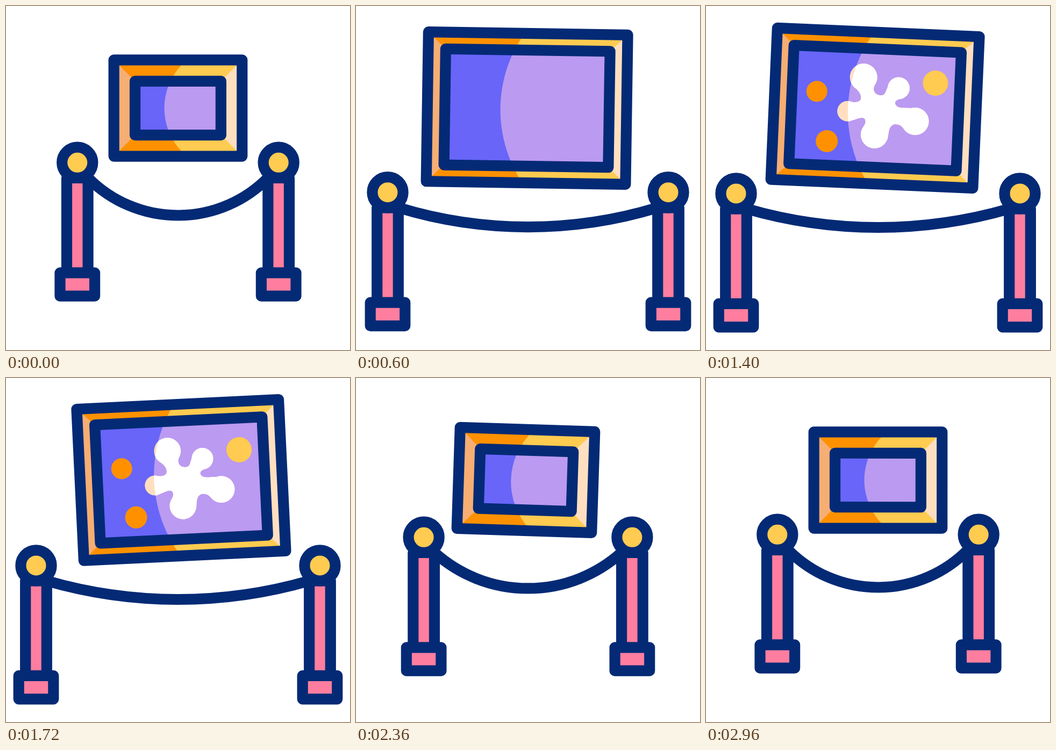
An HTML page with a canvas that plays this animation: 640x640 px, repeating every 3 s.

```html
<!DOCTYPE html>
<html lang="en">
<head>
<meta charset="utf-8">
<title>Gallery</title>
<style>
html, body { margin: 0; width: 100%; height: 100%; overflow: hidden; background: #fff; }
canvas { display: block; width: 100vmin; height: 100vmin; }
</style>
</head>
<body>
<canvas id="stage" width="640" height="640"></canvas>
<script>
const c = document.getElementById('stage').getContext('2d');
const LOOP = 3000;
const NAVY = '#042a75', PINK = '#ff7e9f', YELLOW = '#ffcb50', ORANGE = '#ff9100',
  PEACH = '#f6ae73', CREAM = '#ffdfbf', BLUE = '#6865f8', LILAC = '#bb9af1';

const SPLAT = new Path2D('M317 147C312 156 317 166 328 166C338 166 337 158 341 150' +
  'A20.5 20.5 0 1 1 364 172C356 174 354 179 357 183C362 190 374 187 386 188' +
  'A25.5 25.5 0 1 1 374 228C369 220 362 218 356 219C346 222 346 231 344.5 243' +
  'A25.5 25.5 0 1 1 299 224C304 217 302 208 295 209C288 209 283 213 277 214' +
  'A19 19 0 1 1 275 180C282 181 288 180 291 176C294 170 290 161 282 155' +
  'A25.5 25.5 0 1 1 317 147Z');

// Swing of the picture: time in ms, angle in degrees
const SWING = [[0, 0], [500, 0], [600, .85], [790, 3.3], [960, .6], [1140, -5.4],
  [1400, 2.46], [1470, 3.3], [1770, -3.2], [2000, .55], [2240, 2.35],
  [2360, 1.85], [2800, .4], [3000, 0]];

const mix = (a, b, k) => a + (b - a) * k;
const clamp = v => Math.min(1, Math.max(0, v));
const smooth = v => (v = clamp(v), v * v * (3 - 2 * v));

// Cubic Bezier easing with end handles (x1, 0) and (x2, 1)
function ease(x, x1 = .41, x2 = .32) {
  x = clamp(x);
  let lo = 0, hi = 1;
  for (let i = 0; i < 24; i++) {
    const s = (lo + hi) / 2, r = 1 - s;
    if (3 * s * r * r * x1 + 3 * s * s * r * x2 + s * s * s < x) lo = s; else hi = s;
  }
  return smooth(lo);
}

const slope = i => (SWING[i + 1][1] - SWING[i][1]) / (SWING[i + 1][0] - SWING[i][0]);

// Monotone tangent: flat at peaks and ends
function tangent(i) {
  if (!i || i === SWING.length - 1) return 0;
  const a = slope(i - 1), b = slope(i);
  return a * b > 0 ? 2 * a * b / (a + b) : 0;
}

function swing(t) {
  let i = 0;
  while (i < SWING.length - 2 && t > SWING[i + 1][0]) i++;
  const [t0, a] = SWING[i], [t1, b] = SWING[i + 1], d = t1 - t0, u = (t - t0) / d, r = 1 - u;
  return mix(a, b, smooth(u)) + d * u * r * (tangent(i) * r - tangent(i + 1) * u);
}

function fill(color) {
  c.fillStyle = color;
  c.fill();
}

function box(w, h, color) {
  c.beginPath();
  c.rect(-w, -h, 2 * w, 2 * h);
  if (color) fill(color);
}

function disc(x, y, r, color) {
  c.beginPath();
  c.arc(x, y, r, 0, 7);
  if (color) fill(color);
}

function post(x, y) {
  c.save();
  c.translate(x, y);
  c.beginPath();
  c.rect(-19.8, 28.6, 39.6, 177);
  fill(PINK);
  c.stroke();
  c.beginPath();
  c.rect(-32.3, 205, 64.6, 43.4);
  fill(PINK);
  c.stroke();
  disc(0, 0, 28.6, YELLOW);
  c.stroke();
  c.restore();
}

function rope(x, y, p) {
  const half = 300 - x, top = y + 28.5, bottom = 389.5 + 22.5 * p, sag = bottom - top;
  const r = (half * half + sag * sag) / (2 * sag), a = Math.asin(half / r);
  c.beginPath();
  c.arc(320, bottom - r, r, Math.PI / 2 - a, Math.PI / 2 + a);
  c.stroke();
}

function grow(x, y, k, draw) {
  if (k <= 0) return;
  c.save();
  c.translate(x, y);
  c.scale(k, k);
  c.translate(-x, -y);
  draw();
  c.restore();
}

function paint(t, shine) {
  const pop = delay => ease((t - 640 - delay) / 240) * (1 - ease((t - 1700 - delay) / 200));
  const dot = (x, y, r, color, delay) => grow(x, y, pop(delay), () => disc(x, y, r, color));
  dot(-109.6, -26.4, 19.5, ORANGE, 30);
  dot(-87.1, 65.4, 20.5, ORANGE, 60);
  dot(110.2, -51.2, 23.5, YELLOW, 60);
  const splat = color => {
    c.save();
    c.rotate(-.0105);
    c.translate(-318.8, -190);
    grow(327, 187, pop(0), () => {
      c.fillStyle = color;
      c.fill(SPLAT);
    });
    c.restore();
  };
  splat(CREAM);
  c.save();
  shine();
  c.clip();
  splat('#fff');
  c.restore();
}

function picture(t, p) {
  const W = mix(119.3, 188, p), H = mix(89.6, 141, p);
  const w = mix(79.9, 155.8, p), h = mix(50.2, 110.2, p);
  const r = mix(117, 252, p), edge = mix(-25.5, -50.5, p);
  const shine = color => disc(edge + r, 0, r, color);
  const panel = (W, H, dark, light) => {
    c.save();
    box(W, H, dark);
    c.clip();
    shine(light);
    c.restore();
  };
  const side = (dir, color) => {
    c.beginPath();
    c.moveTo(dir * W, -H);
    c.lineTo(dir * w, -h);
    c.lineTo(dir * w, h);
    c.lineTo(dir * W, H);
    fill(color);
  };
  c.save();
  c.translate(320, 65);
  c.rotate(swing(t) * Math.PI / 180);
  c.translate(0, 125);
  panel(W, H, ORANGE, YELLOW);
  side(-1, PEACH);
  side(1, CREAM);
  box(W, H);
  c.stroke();
  panel(w, h, BLUE, LILAC);
  paint(t, shine);
  box(w, h);
  c.stroke();
  c.restore();
}

function frame(now) {
  const t = now % LOOP;
  const p = ease(t / 761) - ease((t - 1830) / 761);
  const x = 132.8 - 76.8 * p, y = 291.3 + 57.6 * p;
  c.fillStyle = '#fff';
  c.fillRect(0, 0, 640, 640);
  c.strokeStyle = NAVY;
  c.lineWidth = 20.2;
  c.lineJoin = 'round';
  picture(t, p);
  rope(x, y, p);
  post(x, y);
  post(640 - x, y);
  requestAnimationFrame(frame);
}
requestAnimationFrame(frame);
</script>
</body>
</html>
```
